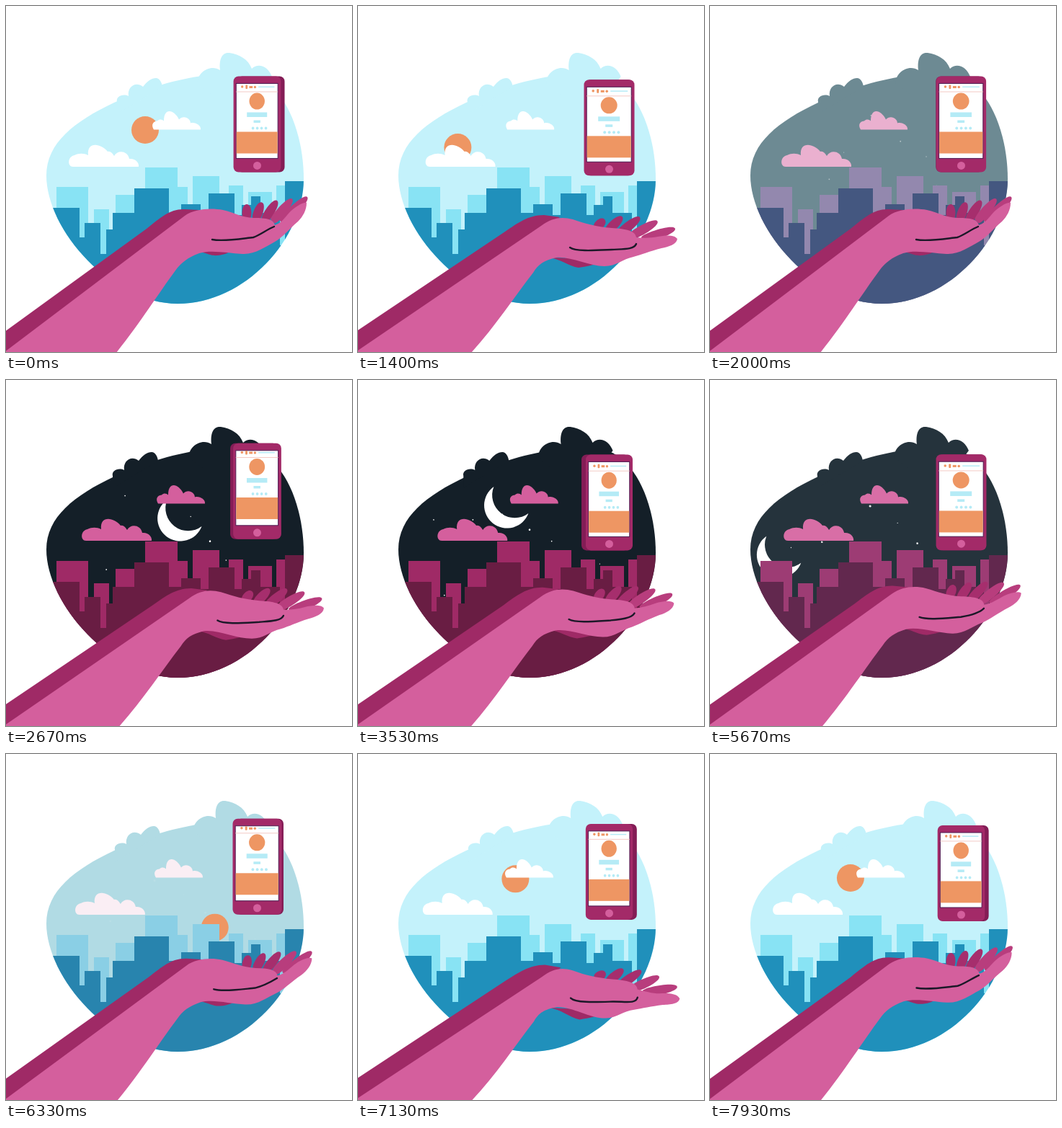
Write an HTML page that moves like this. It is 480 by 480 pixels and loops after 7.99 s.

```html
<!DOCTYPE html>
<html lang="en">
<head>
<meta charset="utf-8">
<title>Phone above an open hand</title>
<style>
  html, body { margin: 0; width: 100%; height: 100%; overflow: hidden; background: #fff; }
  svg { display: block; width: 100%; height: 100%; }
</style>
</head>
<body>
<svg id="stage" viewBox="0 0 480 480">
  <defs>
    <path id="blob" d="M56 235C56 190 95 160 150 134C190 116 225 104 272 97C320 90 350 92 372 115C400 145 413 195 413 240C413 322 332 413 238 413C147 413 56 311 56 235Z"/>
    <clipPath id="inside"><use href="#blob"/></clipPath>
  </defs>
  <g id="sky">
    <use href="#blob"/>
    <path id="treesLeft" d="M150 133C148 126 158 121 166 125C164 112 176 104 186 112C192 104 198 100 204 100C209 100 212 106 213 112L150 150Z"/>
    <path id="treesRight" d="M258 108C256 92 276 80 289 89C287 70 294 64 302 65C316 67 328 74 333 87C342 78 356 84 361 98L340 125H280Z"/>
  </g>
  <g clip-path="url(#inside)">
    <g id="stars" fill="#fff"></g>
    <circle id="sun" r="19" fill="#ee9663"/>
    <path id="moon" fill="#fff" d="M-18 -24A31.7 31.7 0 1 0 30 13A31.5 31.5 0 0 1 -18 -24Z"/>
    <g id="clouds">
      <path id="cloudLeft" d="M6 29C-2 29 -2 15 8 13C14 10 21 10 27 13C25 -6 44 -4 54 8C58 7 61 11 63 14C68 5 82 7 84 18C92 17 98 23 97 29Z"/>
      <path id="cloudRight" d="M3 25C0 20 0 14 8 13C11 10 15 11 17 13C17 -6 31 -3 38 11C44 4 54 9 54 16C60 14 69 19 68 25Z"/>
    </g>
    <path id="cityBack" d="M70 420V251H114V305H122V282H143V312H152V262H193V224H238V251H252V290H259V236H296V290H309V249H329V290H336V258H369V290H375V249H390V420Z"/>
    <path id="cityFront" d="M50 420V280H102V321H109V301H131V344H139V310H148V287H178V253H226V287H243V275H270V290H281V260H317V290H327V276H340V264H353V287H380V332H387V243H415V420Z"/>
  </g>
  <g id="phone">
    <rect id="phoneBack" width="66" height="133" rx="7" fill="#841d56"/>
    <rect id="phoneFace" height="133" rx="7" fill="#a32a68"/>
    <g id="screen">
      <rect x="-31" y="10" width="62" height="104" fill="#fff" stroke="#4a1a50"/>
      <g id="page">
        <g fill="#ee9663">
          <circle cx="-22" cy="15.5" r="1.8"/>
          <rect x="-17" y="13" width="3" height="5.5" rx="1"/>
          <rect x="-11.5" y="14.5" width="5" height="3"/>
          <circle cx="-3" cy="16" r="1.8"/>
          <circle cy="35.5" r="11.5"/>
          <rect x="-30.5" y="78" width="61" height="30"/>
        </g>
        <path d="M-31 22.5H31" stroke="#f3c9c4"/>
        <g id="lines" fill="#b5ebf6">
          <rect x="2" y="15" width="24" height="1.5"/>
          <rect x="-15" y="51" width="30" height="6.5"/>
          <rect x="-5" y="62" width="10" height="3.5"/>
        </g>
      </g>
    </g>
    <circle cx="348.5" cy="124" r="5.5" fill="#d45f9d"/>
  </g>
  <g id="fingers"></g>
  <path id="heel" fill="#9f2a66"/>
  <path id="armShade" fill="#9f2a66"/>
  <path id="hand" fill="#d45f9d"/>
  <path id="crease" fill="none" stroke="#1c1828" stroke-width="2.4" stroke-linecap="round"/>
</svg>
<script>
const LOOP = 7990, STEPS = 120, TAU = Math.PI * 2;
const el = Object.fromEntries([...document.querySelectorAll('[id]')].map(e => [e.id, e]));
const set = (e, attrs) => { for (const k in attrs) e.setAttribute(k, attrs[k]); };
const add = (parent, tag, attrs) => {
  const e = document.createElementNS('http://www.w3.org/2000/svg', tag);
  set(e, attrs);
  return parent.appendChild(e);
};
const clamp = x => Math.max(0, Math.min(1, x));
const mix = (a, b, k) => a + (b - a) * k;
const blend = (a, b, k) => `rgb(${a.map((v, i) => Math.round(mix(v, b[i], k)))})`;
const move = (e, x, y) => set(e, { transform: `translate(${x} ${y})` });

// x runs slightly ahead of y halfway, so the fingertips travel on an arc.
const arcMix = (a, b, k) => mix(a, b, k + 0.46 * k * (1 - k));

// Blends two paths of equal structure.
function morph([up, down], k) {
  const ends = down.match(/-?\d+/g);
  let n = 0;
  return up.replace(/-?\d+/g, v => (n % 2 ? mix : arcMix)(+v, +ends[n++], k).toFixed(2));
}

for (let i = 0; i < 4; i++) add(el.lines, 'circle', { cx: -6 + 6.4 * i, cy: 73, r: 2 });

// Stars scattered on a ring that turns about the city.
let seed = 11;
const random = () => (seed = seed * 16807 % 2147483647) / 2147483647;
for (let i = 0; i < 12; i++) {
  const angle = TAU * (0.42 + 0.045 * i), radius = 105 + 85 * random();
  add(el.stars, 'circle', {
    cx: 220 + radius * Math.cos(angle), cy: 330 + radius * Math.sin(angle), r: 0.6 + 1.4 * random() ** 2
  });
}

// Sun and moon rise fast, hover near the top and set fast.
function orbit(t) {
  const v = (t - LOOP / 2) / 1670;
  return [193 - 48 * v - 50 * v ** 7, 172 + 70 * v ** 6];
}

// Raised and lowered outlines.
const poses = {
  hand: [
    'M-2 480L248 291C262 281 285 280 301 283C318 287 326 293 344 294C362 294 371 296 373 304C385 300 388 290 398 282C406 276 413 272 417 273C417 283 412 292 405 299C393 309 384 321 373 327C360 334 345 345 328 344C308 343 285 338 268 343C252 349 243 356 235 367C212 398 186 440 153 481L-2 481Z',
    'M-2 479L254 305C270 293 283 292 298 296C316 302 330 306 352 308C372 309 385 312 386 321C396 322 406 322 416 320C426 318 439 317 443 323C442 331 431 334 421 336C405 340 393 345 382 348C367 351 358 361 342 361C320 361 295 347 275 349C258 353 250 358 243 370C218 402 190 445 157 481L-2 481Z'],
  armShade: [
    'M-2 452L195 309C215 293 228 281 248 282L268 283L240 320L-2 482Z',
    'M-2 451L204 313C222 301 236 290 258 290L280 293L250 320L-2 482Z'],
  heel: [
    'M262 340C280 342 282 347 294 346C304 345 310 342 316 336Z',
    'M264 349C282 351 292 361 306 363C318 361 332 359 345 351Z'],
  crease: [
    'M286 324C302 327 325 323 343 321C352 318 362 310 372 306',
    'M294 335C302 341 330 339 352 338C368 337 383 338 386 330']
};
const fingers = Array.from({ length: 5 }, (_, i) =>
  add(el.fingers, 'path', { fill: i < 3 ? '#a62e6d' : '#b83d7d' }));

function leafPath(bx, by, tx, ty) {
  const len = Math.hypot(tx - bx, ty - by), nx = (by - ty) / len, ny = (tx - bx) / len;
  const at = (x, y, w) => `${x + nx * w} ${y + ny * w}`;
  return `M${at(bx, by, 3)}C${at(bx, by, 8)} ${at(tx, ty, 8)} ${tx} ${ty}`
    + `C${at(tx, ty, -8)} ${at(bx, by, -8)} ${at(bx, by, -3)}Z`;
}

function drawHand(phase) {
  const k = (0.978 - Math.cos(phase - 0.21)) / 1.478;
  for (const id in poses) set(el[id], { d: morph(poses[id], k) });
  fingers.forEach((finger, i) => set(finger, { d: leafPath(
    arcMix(334 + 12 * i, 330 + 16 * i, k), mix(296 + i, 308 + 4 * i, k),
    arcMix(334 + 21 * i, 342 + 24.5 * i, k), mix(275 - 2.5 * i, 292 + 2.3 * (i - 1.3) ** 2, k)) }));
}

function drawPhone(phase, turn) {
  const lift = Math.cos(phase - 1.815), yaw = Math.cos(turn + 0.42);
  const half = 35 - 2.5 * yaw * yaw;
  move(el.phone, 0, 95.5 - 8 * lift);
  set(el.phoneBack, { x: 315.5 + 5.5 * yaw });
  set(el.phoneFace, { x: 348.5 - half, width: half * 2 });
  set(el.screen, { transform: `translate(348.2 0) scale(${1 - 0.08 * yaw * yaw} 1)` });
  move(el.page, 0, -1.3 - 1.6 * lift);
}

function draw(t) {
  const turn = TAU * t / LOOP, sway = Math.cos(turn);
  const night = clamp((t - 1585) / 835) - clamp((t - 5580) / 835);

  set(el.sky, { fill: blend([196, 242, 251], [20, 31, 40], night) });
  set(el.clouds, { fill: blend([255, 255, 255], [212, 95, 157], night) });
  set(el.cityBack, { fill: blend([136, 227, 244], [159, 42, 102], night) });
  set(el.cityFront, { fill: blend([32, 144, 187], [105, 29, 67], night) });

  move(el.treesLeft, 4 * sway, 0);
  move(el.treesRight, 8 * sway, 0);
  move(el.cloudLeft, 99 - 12 * sway, 194);
  move(el.cloudRight, 206 - 4 * sway, 146.5);

  move(el.sun, ...orbit((t + LOOP / 2) % LOOP));
  move(el.moon, ...orbit(t));
  const spin = 100 * (1 - clamp((t - 1585) / 4830)) ** 1.5;
  set(el.stars, { opacity: night, transform: `rotate(${spin} 220 330)` });

  drawPhone(4 * turn, turn);
  drawHand(4 * turn);
}

const start = performance.now();
function tick() {
  const t = (performance.now() - start) % LOOP;
  draw(Math.floor(t / LOOP * STEPS) * LOOP / STEPS);
  requestAnimationFrame(tick);
}
tick();
</script>
</body>
</html>
```
